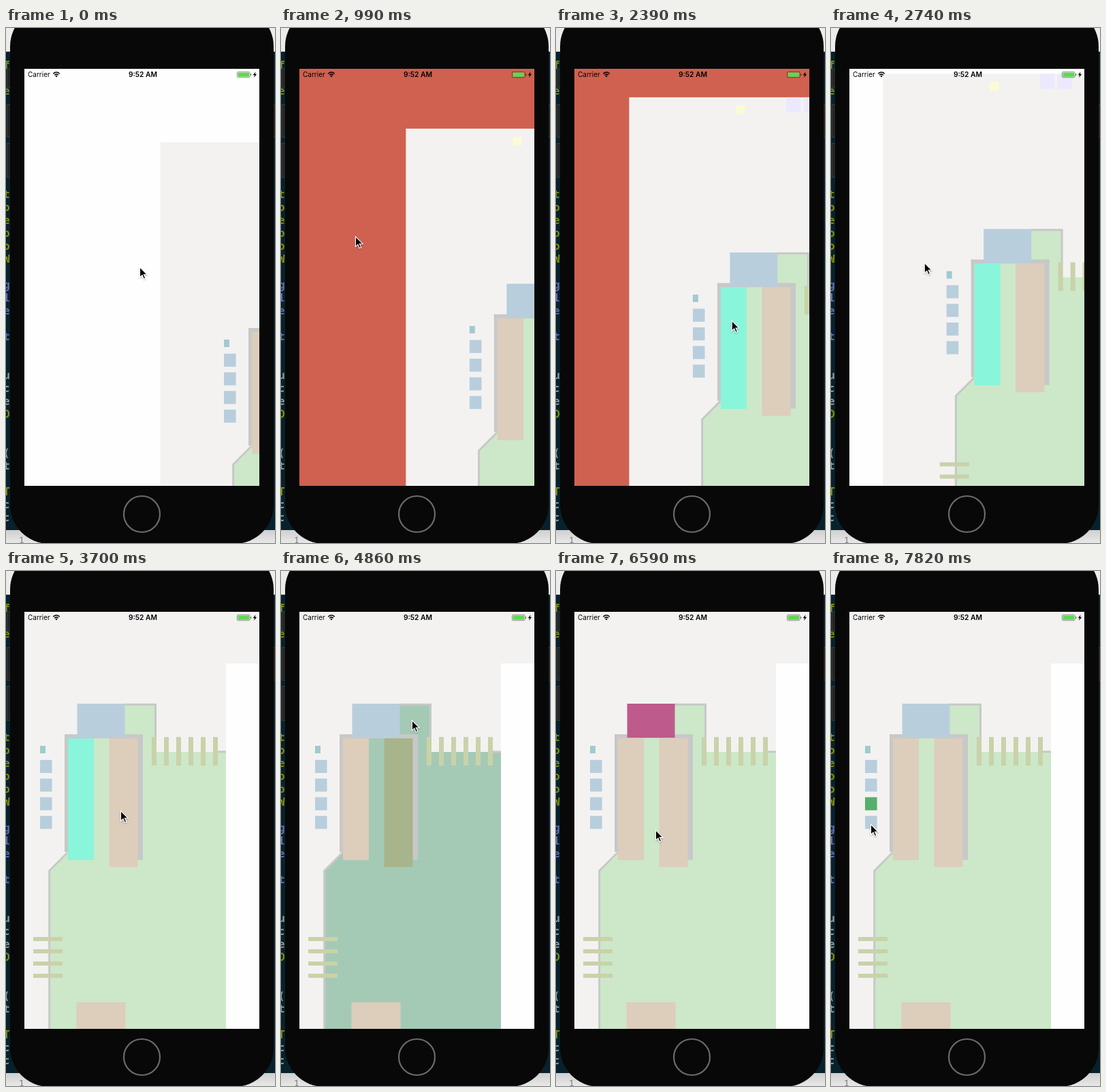
Write an HTML page that moves like this. It is 395 px wide and 757 px high and loops after 8 s.

```html
<!DOCTYPE html>
<html lang="en">
<head>
<meta charset="utf-8">
<title>Map in a phone simulator</title>
<style>
  html, body { margin: 0; width: 100%; height: 100%; overflow: hidden; background: #eee; }
  svg { display: block; width: 395px; height: 757px; }
  .code { font: 700 16px "Noto Sans Mono", "DejaVu Sans Mono", monospace; }
  .status { font-family: Inter, Roboto, sans-serif; fill: #000; }
</style>
</head>
<body>
<svg viewBox="0 0 395 757" xmlns="http://www.w3.org/2000/svg">
  <defs>
    <clipPath id="screen"><rect x="27" y="60" width="345" height="613"/></clipPath>
    <linearGradient id="floor" x1="0" y1="0" x2="0" y2="1">
      <stop offset="0" stop-color="#cfcfcf"/><stop offset="1" stop-color="#e8e8e8"/>
    </linearGradient>
    <filter id="soft" x="-50%" y="-50%" width="200%" height="200%">
      <feDropShadow dx="0" dy="1" stdDeviation="0.8" flood-color="#000" flood-opacity="0.35"/>
    </filter>
  </defs>

  <!-- desktop behind the phone -->
  <rect width="395" height="35" fill="#ececec"/>
  <rect y="34" width="395" height="1" fill="#bdbdbd"/>
  <rect y="35" width="395" height="703" fill="#07222c"/>
  <rect y="738" width="395" height="19" fill="url(#floor)"/>
  <text x="19" y="757" class="code" fill="#777" style="font-size:13px;font-weight:400">1</text>
  <g id="code" class="code"></g>

  <!-- phone body -->
  <g fill="#252525" stroke="#3c3c3c">
    <rect x="1.5" y="60" width="6" height="28"/>
    <rect x="1.5" y="112.5" width="6" height="48"/>
    <rect x="1.5" y="169.5" width="6" height="50"/>
    <rect x="390.5" y="112.5" width="5" height="48"/>
  </g>
  <rect x="6" y="-30" width="387" height="788" rx="57" fill="#080808"/>
  <circle cx="199.5" cy="714.5" r="26.5" fill="none" stroke="#6b6b6b" stroke-width="2.2"/>

  <g clip-path="url(#screen)">
    <rect id="back" x="27" y="60" width="345" height="613"/>
    <g id="map"></g>
  </g>

  <!-- status bar -->
  <g class="status">
    <text x="32" y="72.3" font-size="10">Carrier</text>
    <text x="201" y="72.3" font-size="10.3" font-weight="600" text-anchor="middle">9:52 AM</text>
    <path d="M69.2 67.2Q74 62.8 78.8 67.2M71.1 69.2Q74 66.6 76.9 69.2"
          fill="none" stroke="#000" stroke-width="1.5"/>
    <path d="M72.3 70.5Q74 69.2 75.7 70.5L74 72.5Z"/>
    <rect x="339.4" y="64.4" width="18.8" height="8.4" rx="1.8" fill="none" stroke="#000" stroke-opacity=".5" stroke-width=".8"/>
    <rect x="340.5" y="65.5" width="16.6" height="6.2" rx=".8" fill="#5ed850"/>
    <rect x="359" y="67" width="1.2" height="3.2" rx=".6" fill-opacity=".5"/>
    <path d="M366.6 64.2L362.6 69.2H365.1L364 73L368.2 67.7H365.7Z"/>
  </g>

  <path id="cursor" d="M.5 .6V15.4L4 12.2L6.4 17.7L8.8 16.7L6.4 11.3H11.2Z"
        fill="#000" stroke="#fff" stroke-width="1.1" filter="url(#soft)"/>
</svg>

<script>
const LOOP = 8000, FADE = 200;
const WALL = '#c8c8c8', TAN = '#ddcdbb', BLUE = '#b9cedc', GRASS = '#cce8c8', BENCH = '#c9d2a9';
const $ = id => document.getElementById(id);
const map = $('map');

function add(parent, tag, attrs) {
  const el = document.createElementNS('http://www.w3.org/2000/svg', tag);
  for (const k in attrs) el.setAttribute(k, attrs[k]);
  return parent.appendChild(el);
}
const box = (x, y, width, height, fill) => add(map, 'rect', { x, y, width, height, fill });
const row = (n, make) => Array.from({ length: n }, (_, i) => make(i));

// editor text cut off by the phone, one letter and one tone per line
const letters = 'f e       toeooW gle t  uceD  (t Tcc';
const shades  = 'o o       oooooo ppp p  gggo  gg ogg';
const tones = { o: '#7f8d08', p: '#6469b4', g: '#8b999b' };
[...letters].forEach((c, i) => {
  add($('code'), 'text', { x: -4, y: 60 + i * 19, fill: tones[shades[i]] || 'none' }).textContent = c;
});

// map, in its resting position
box(-43.5, -33, 900, 900, '#f3f2f1');
box(323, 136, 500, 731, '#fefefe');
box(114, -21, 12.5, 12.5, '#fdfbd3');
row(2, i => box(187 + 26 * i, -33, 21.5, 22, '#ece8fd'));
const grass = add(map, 'path', {
  d: 'M63.5 867V440L89 414V242H174V196H219.5V266H323V867Z', fill: GRASS });
add(map, 'path', {
  d: 'M63.7 867V440.5L90.2 414M174 196.3H219.5V245M308 265.8H323',
  fill: 'none', stroke: WALL, 'stroke-width': 3 });
box(86, 240, 5, 173, WALL);
box(86, 240, 115, 6, WALL);
box(193, 240, 8, 184.5, WALL);
const hall = box(104.5, 195, 70, 50, BLUE);
const wingA = box(91, 246, 38, 179, TAN);
const wingB = box(151.5, 246, 42, 189, TAN);
box(103.5, 634, 72, 120, TAN);
box(50, 257, 8, 11, '#a3c9d2');
const plots = row(4, i => box(50, 277.7 + 27.4 * i, 17.6, 19.2, BLUE));
row(6, i => box(214 + 18 * i, 244, 7, 42, BENCH));
row(4, i => box(40, 538 + 18 * i, 43, 6, BENCH));

// glides: start, end, x, y; the part rests between them
const scroll = [[0, 0, 270, 201], [620, 990, 227, 181], [990, 1430, 157, 139],
  [1430, 1700, 151, 135], [2390, 2740, 120, 100.7], [2740, 3090, 0, 0]];
const pointer = [[0, 0, 196, 351], [100, 260, 188, 348], [620, 990, 109, 306],
  [990, 1430, 59, 276], [1600, 2120, 258, 430], [2390, 2740, 137, 345], [2740, 3090, 60, 296],
  [3200, 3700, 168, 352], [3970, 4410, 192, 219], [4860, 5220, 139, 217], [5640, 6240, 182, 391],
  [6510, 6860, 26, 345], [6860, 7120, 55, 340], [7570, 7820, 58, 372]];

// each tap colours one shape and lets the one before fade back
const taps = [[620, $('back'), '#d06050', '#fefefe'], [2390, wingA, '#89f5db', TAN],
  [3970, wingB, '#a8b48c', TAN], [4860, grass, '#a4cab6', GRASS],
  [5640, hall, '#be5a8c', BLUE], [7300, plots[2], '#55b06c', BLUE]];

const portion = (t, from, to) => Math.min(1, Math.max(0, (t - from) / (to - from || 1)));

function position(glides, t) {
  let [, , x, y] = glides[0];
  for (const [from, to, nextX, nextY] of glides.slice(1)) {
    const p = portion(t, from, to);
    x += (nextX - x) * p;
    y += (nextY - y) * p;
  }
  return [x, y];
}

function mix(a, b, p) {
  const rgb = hex => [1, 3, 5].map(i => parseInt(hex.slice(i, i + 2), 16));
  const end = rgb(b);
  return `rgb(${rgb(a).map((c, i) => Math.round(c + (end[i] - c) * p))})`;
}

function render(t) {
  map.setAttribute('transform', `translate(${position(scroll, t)})`);
  $('cursor').setAttribute('transform', `translate(${position(pointer, t)})`);
  taps.forEach(([time, shape, lit, plain], i) => {
    const end = i + 1 < taps.length ? taps[i + 1][0] : LOOP;
    shape.setAttribute('fill', t < time ? plain : mix(lit, plain, portion(t, end, end + FADE)));
  });
}

const start = performance.now();
function tick() {
  render((performance.now() - start) % LOOP);
  requestAnimationFrame(tick);
}
tick();
</script>
</body>
</html>
```
